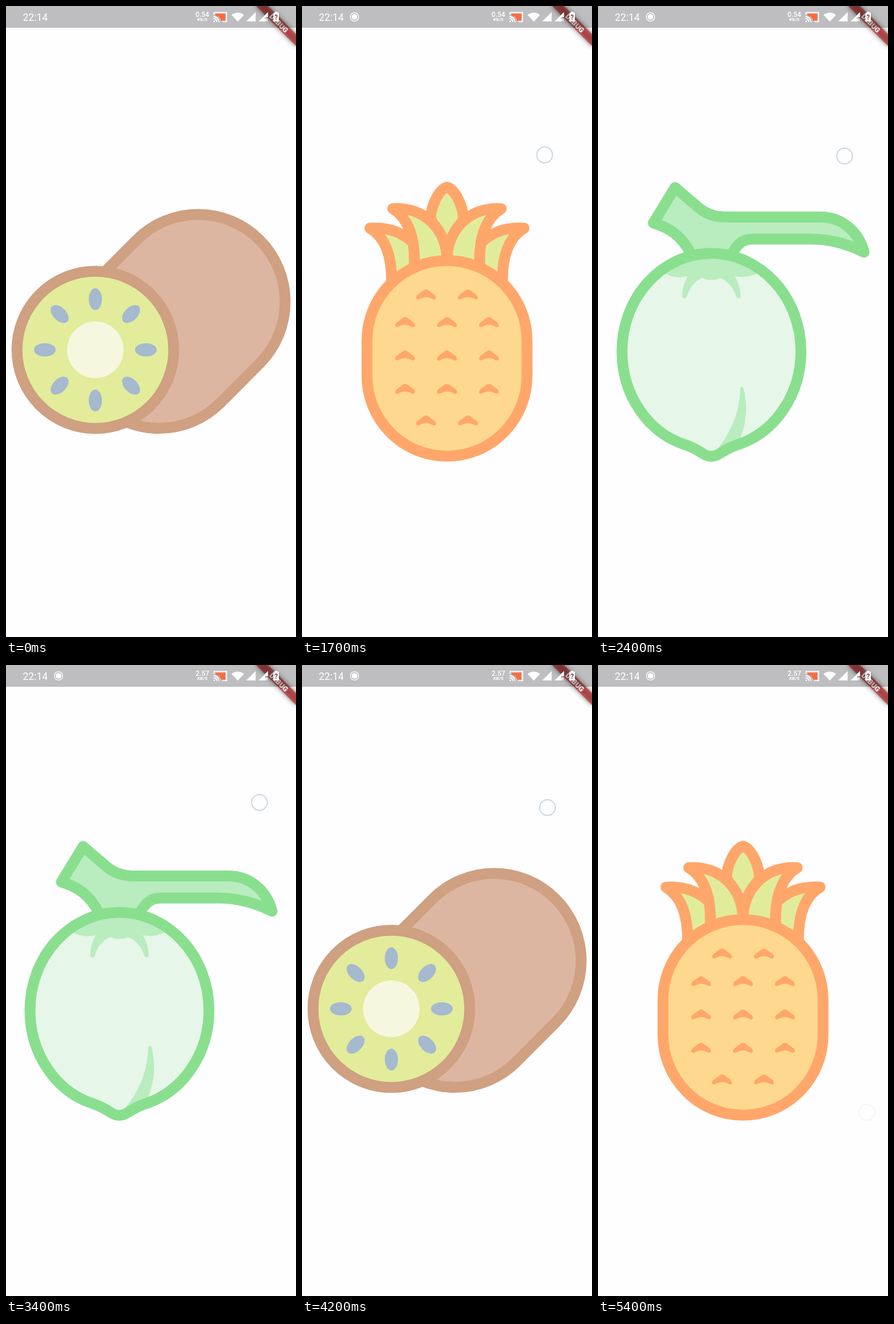
These frames come from a looping animation (508 px wide and 1102 px high, 5900 ms). An HTML page:

```html
<!DOCTYPE html>
<html lang="en">
<head>
<meta charset="utf-8">
<title>Fruit picker</title>
<style>
html, body { margin: 0; width: 100%; height: 100%; overflow: hidden; background: #fefdff; }
svg { display: block; width: 100%; height: 100%; }
text { fill: #fff; font-family: Roboto, "Noto Sans", sans-serif; }
.line { stroke-width: 19; stroke-linejoin: round; stroke-linecap: round; }
.loop { animation: 5.9s step-end infinite; }

.kiwi { animation-name: kiwi; }
.mangosteen { animation-name: mangosteen; }
.coconut { animation-name: coconut; }
.pineapple { animation-name: pineapple; }
.rec { animation-name: rec; }
.slow { animation-name: slow; }
.fast { animation-name: fast; }
.touch { animation-name: touch; }

@keyframes kiwi {
  0%, 71.18% { visibility: visible; }
  27.11%, 74.57%, 100% { visibility: hidden; }
}
@keyframes mangosteen {
  0%, 40.67%, 100% { visibility: hidden; }
  33.89% { visibility: visible; }
}
@keyframes coconut {
  0%, 67.79%, 100% { visibility: hidden; }
  40.67% { visibility: visible; }
}
@keyframes pineapple {
  0%, 33.89%, 71.18% { visibility: hidden; }
  27.11%, 67.79%, 74.57%, 100% { visibility: visible; }
}
@keyframes rec { 0% { visibility: hidden; } 5.08%, 100% { visibility: visible; } }
@keyframes slow { 0% { visibility: visible; } 49.15%, 100% { visibility: hidden; } }
@keyframes fast { 0% { visibility: hidden; } 49.15%, 100% { visibility: visible; } }
@keyframes touch {
  0% { opacity: 0; transform: translate(425px, 260px); }
  25.42% { opacity: 1; transform: translate(425px, 260px); }
  33.89% { opacity: 1; transform: translate(432px, 262px); }
  44.06% { opacity: 1; transform: translate(435px, 258px); }
  45.76% { opacity: 1; transform: translate(438px, 255px); }
  49.15% { opacity: 1; transform: translate(441px, 249px); }
  57.62% { opacity: 1; transform: translate(444px, 240px); }
  67.79% { opacity: 1; transform: translate(430px, 249px); }
  74.57% { opacity: .75; transform: translate(428.5px, 257px); }
  83.05% { opacity: .75; transform: translate(428.5px, 257px); animation-timing-function: steps(5, end); }
  91.52%, 100% { opacity: .2; transform: translate(471px, 781px); }
}
</style>
</head>
<body>
<svg viewBox="0 0 508 1102">
  <defs>
    <filter id="blur" x="-50%" y="-200%" width="200%" height="500%"><feGaussianBlur stdDeviation="4.9"/></filter>
    <clipPath id="inBar"><rect width="508" height="38"/></clipPath>
    <g id="spoke">
      <ellipse cy="-88.500" rx="11.500" ry="19"/>
      <ellipse cy="88.500" rx="11.500" ry="19"/>
    </g>
    <path id="pip" d="M-2-27Q0-23 2-27L22.500-61A26 26 0 1 0-22.500-61Z"/>
    <path id="mark" d="M-4-7Q0-10 4-7L16 2Q20 9 13 9Q6 5 0 5Q-6 5-13 9Q-20 9-16 2Z"/>
    <g id="two"><use href="#mark" x="217.300"/><use href="#mark" x="290.700"/></g>
    <g id="three"><use href="#mark" x="180.600"/><use href="#mark" x="254"/><use href="#mark" x="327.400"/></g>
    <g id="crown">
      <path d="M119 388C148 386 176 394 197 416V500H157V480C157 440 148 405 119 388Z"/>
      <path d="M159 354C214 350 254 390 254 445V480H197V445C197 400 185 370 159 354Z"/>
    </g>
  </defs>
  <rect width="508" height="1102" fill="#fefdff"/>

  <g class="loop kiwi">
    <g stroke-linecap="round">
      <path d="M268 585L336.500 516.500" stroke="#cfa081" stroke-width="324"/>
      <path d="M268 585L336.500 516.500" stroke="#ddb6a2" stroke-width="286"/>
    </g>
    <g transform="translate(156.500 600.500)">
      <circle class="line" r="137.300" fill="#e2ec9b" stroke="#cfa081"/>
      <circle r="49.500" fill="#f5f8df"/>
      <g fill="#a5b9cf">
        <use href="#spoke"/>
        <use href="#spoke" transform="rotate(45)"/>
        <use href="#spoke" transform="rotate(90)"/>
        <use href="#spoke" transform="rotate(135)"/>
      </g>
    </g>
  </g>

  <g class="loop mangosteen" stroke="#ff5c7d">
    <circle class="line" cx="168.500" cy="603.500" r="149" fill="#ff9db0"/>
    <g transform="translate(355.500 619.500)">
      <circle class="line" r="133" fill="#f0c5de"/>
      <g fill="#fefdff" stroke="none">
        <use href="#pip"/>
        <use href="#pip" transform="rotate(60)"/>
        <use href="#pip" transform="rotate(120)"/>
        <use href="#pip" transform="rotate(180)"/>
        <use href="#pip" transform="rotate(240)"/>
        <use href="#pip" transform="rotate(300)"/>
      </g>
    </g>
    <g fill="#e1ec9b">
      <path class="line" d="M156 435C157 400 165 368 186 349.500L217 367C203 382 197 402 196 435"/>
      <path stroke-width="38" stroke-linejoin="round" paint-order="stroke" d="M67 482C67 458 95 440 128 440C139 440 149 442 158 447Q177 441 195 447C204 442 214 440 225 440C259 440 287 458 287 483C287 498 270 507 248 507C235 507 223 505 214 501C206 509 192 514 177 514C162 514 148 509 140 501C131 505 119 507 105 507C84 507 67 498 67 482Z"/>
    </g>
  </g>

  <g class="loop coconut" fill="#b9ecbe">
    <path class="line" stroke="#8adf8f" d="M162 432C147 402 125 387 97 379L135 317L176 352C190 364 208 368.500 222 368.500H390C428 368.500 457 395 466 430C436 415 405 407 372 407H272C255 407 245 414 235 432"/>
    <path id="shell" fill="#e6f6e8" d="M198.500 432C285 432 355.500 509 355.500 603C355.500 680 309 745 245 766C226 772 219 779 209 784Q198.500 789 188 784C178 779 171 772 152 766C88 745 42 680 42 603C42 509 112 432 198.500 432Z"/>
    <path d="M110 462Q130 478 157 472Q148 488 147.500 507Q150 514 155 509C160 492 168 481 183 475Q198 482 214 475C229 481 237 492 243 509Q248 513 250 507Q249 488 240 472Q265 477 287 462L250 435H150Z"/>
    <path d="M249 668Q252 662 255 668C262 694 262 726 247 760L203 780C232 750 249 708 249 668Z"/>
    <use href="#shell" class="line" stroke="#8adf8f" style="fill-opacity:0"/>
  </g>

  <g class="loop pineapple" stroke="#ffa76b" fill="#e1ec9b">
    <path class="line" d="M254 316.500C241 320 227 345 225 371L254 430L283 371C281 345 267 320 254 316.500Z"/>
    <use href="#crown" class="line"/>
    <use href="#crown" class="line" transform="matrix(-1 0 0 1 508 0)"/>
    <rect class="line" x="113.800" y="444.500" width="280.400" height="341.700" rx="140.200" fill="#ffd88f"/>
    <g fill="#ffa76b" stroke="none">
      <use href="#two" y="503.500"/>
      <use href="#three" y="551.700"/>
      <use href="#three" y="610"/>
      <use href="#three" y="668.300"/>
      <use href="#two" y="723.500"/>
    </g>
  </g>

  <circle class="loop touch" r="13.800" fill="none" stroke="#cdd6e5" stroke-width="2"/>

  <!-- corner ribbon -->
  <g transform="translate(508 0) rotate(45)">
    <rect x="-49.500" y="34.600" width="99" height="14.900" opacity=".5" filter="url(#blur)"/>
    <rect x="-49.500" y="34.600" width="99" height="14.900" fill="#b71c1c" fill-opacity=".63"/>
    <text y="46.500" font-size="12.600" font-weight="900" text-anchor="middle">DEBUG</text>
  </g>

  <!-- status bar -->
  <rect width="508" height="38" fill-opacity=".25"/>
  <g fill="#fff" clip-path="url(#inBar)">
    <text x="29.500" y="25.500" font-size="17.500">22:14</text>
    <g class="loop rec">
      <circle cx="92" cy="19" r="7.400" fill="none" stroke="#fff" stroke-width="1.400"/>
      <circle cx="92" cy="19" r="5"/>
    </g>
    <g text-anchor="middle" font-weight="500">
      <text class="loop slow" x="344" y="18.500" font-size="12">0.54</text>
      <text class="loop fast" x="344" y="18.500" font-size="12">2.57</text>
      <text x="344" y="26.300" font-size="8" font-weight="700">KB/S</text>
    </g>
    <path d="M367 13.500H384V25.500H377Q375 18 367 16.500Z" fill="#fe6a3c"/>
    <g fill="none" stroke="#fff" stroke-width="1.800">
      <path d="M364.500 15.500V11.400H386.300V27.300H379"/>
      <path d="M363.500 18.500A9.500 9.500 0 0 1 373 28M363.500 22A6 6 0 0 1 369.500 28"/>
    </g>
    <path d="M363.500 25.200A2.800 2.800 0 0 1 366.300 28H363.500Z"/>
    <path d="M395 15.500Q406 7.500 417 15.500L406 27.300Z"/>
    <path d="M437.300 10.500V27H420.800ZM459 10.500V19.500H454V27H442.500Z"/>
    <text x="453.700" y="27.300" font-size="8" font-weight="700">R</text>
    <path d="M471 11.500V10H475.500V11.500H478V27H468.500V11.500Z"/>
    <text x="473.300" y="24" font-size="12" font-weight="700" text-anchor="middle" style="fill:#7c4547">?</text>
  </g>
</svg>
</body>
</html>
```
